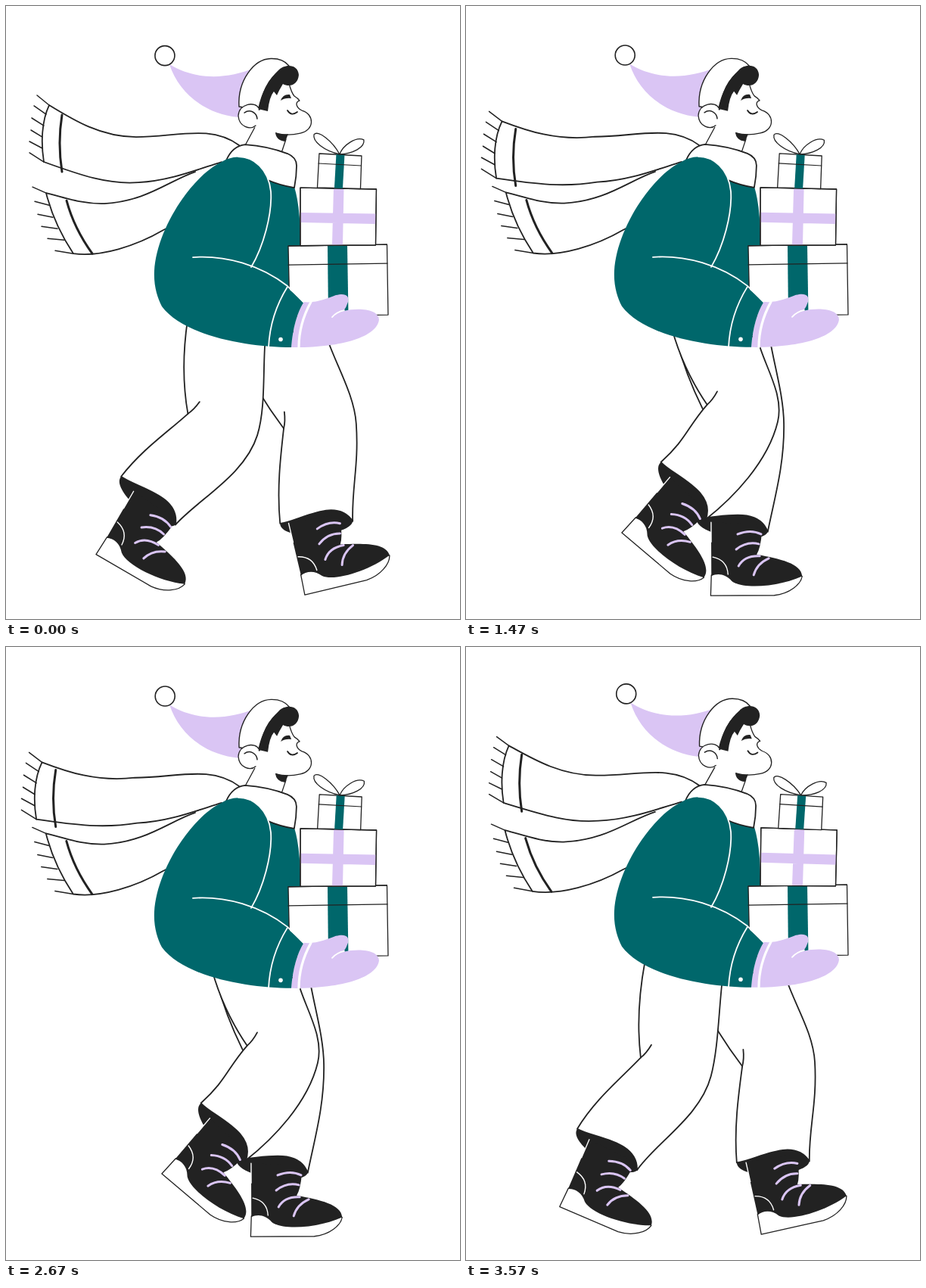
An HTML page that plays this animation: 600x810 px, repeating every 3.6 s.

```html
<!DOCTYPE html>
<html lang="en">
<head>
<meta charset="utf-8">
<title>Winter walk with presents</title>
<style>
html, body { margin: 0; width: 100%; height: 100%; overflow: hidden; background: #fff; }
svg { display: block; width: 600px; height: 810px; }
.ink { fill: none; stroke: #222; stroke-width: 1.8; }
.body { fill: #fff; stroke: #222; stroke-width: 1.8; }
.thin { fill: #fff; stroke: #222; stroke-width: 1.3; }
.dark { fill: #222; }
.teal { fill: #00676b; }
.lilac { fill: #dac5f4; }
.seam { fill: none; stroke: #fff; stroke-width: 1.8; }
.lace { fill: none; stroke: #dac5f4; stroke-width: 3; }
path { stroke-linecap: round; stroke-linejoin: round; }
</style>
</head>
<body>
<svg viewBox="0 0 600 810">
  <defs>
    <g id="boot">
      <path class="thin" d="M1,-27 L0,0 L84,0 C104,-2 119,-14 121,-25 C110,-30 20,-40 1,-27Z"/>
      <path class="dark" d="M1,-97 L1,-26 C9,-30 20,-29 28,-19 C42,-8 90,-11 121,-25 C120,-42 92,-48 61,-54 Q66,-62 68,-82 L60,-94Z"/>
      <path class="seam" style="stroke-width:1.4" d="M1,-97 V-71 M3,-51 Q22,-47 23,-28"/>
      <path class="lace" d="M36,-81 Q53,-88 67,-81 M34,-61 Q48,-72 64,-68 M37,-39 Q45,-53 65,-52 M57,-27 Q61,-42 77,-49"/>
    </g>
  </defs>
  <g id="scarf">
    <path class="body" id="lowTail"/>
    <path class="ink" id="lowFringe" style="stroke-width:1.5"/>
    <path class="ink" id="lowBand" style="stroke-width:3"/>
    <path class="body" id="topTail"/>
    <path class="ink" id="topFringe" style="stroke-width:1.5"/>
    <path class="ink" id="topBand" style="stroke-width:3"/>
  </g>
  <g id="legs"></g>
  <g id="head">
    <path fill="#fff" d="M329,158 L314,190 L362,198 L372,168 L345,150Z"/>
    <path class="ink" style="stroke-width:1.3" d="M329,160 L315,186 M370,176 L364,194"/>
    <path class="lilac" d="M328,82 C292,97 250,98 216,77 C228,114 262,143 308,147 L316,110Z"/>
    <circle class="thin" cx="210" cy="65.5" r="13" style="stroke-width:1.6"/>
    <path fill="#fff" d="M335,110 L374,96 L381,117 L388,124 L384,130 L392,138 C410,146 405,168 382,169 L357,168 L328,160Z"/>
    <path class="ink" style="stroke-width:1.3" d="M374,102 Q377,114 381,119 Q386,122 388,125 Q384,126 384,130 Q385,135 391,138 C408,143 408,164 389,168 Q372,172 357,168"/>
    <path class="dark" d="M356,167 Q364,171 373,169 L369,179 Q357,178 356,167Z"/>
    <path class="body" style="stroke-width:1.4" d="M308,133 C306,98 328,70 350,69.500 Q366,69 374,79 C352,88 339,108 335,137Z"/>
    <path class="dark" d="M333,136 C338,113 347,97 360,85 C368,76 386,76 387,91 C386,104 375,108 366,103 Q361,111 358,118 L354,113 Q348,120 346,139Z"/>
    <path class="dark" d="M363,125 Q366,116 375,117 L377,122 Q369,121 363,125Z"/>
    <path class="ink" d="M372,138 Q377,146 385,140"/>
    <path class="thin" d="M334,135 C330,126 308,128 307,145 C308,160 323,164 330,158"/>
    <path class="ink" style="stroke-width:1.5" d="M315,141 C322,136 331,140 332,149"/>
  </g>
  <g id="torso"><path class="teal" d="M300,210 L348,228 L381,239 Q389,265 389,310 L389,400 L300,400Z"/></g>
  <g id="collar"><path class="body" d="M291,204 Q299,185 316,183 Q346,185 372,195 Q384,200 384,211 Q384,225 381,240 Q362,237 346,230 L320,206Z"/></g>
  <g id="bigBox">
    <path class="thin" d="M373,317 L503.500,315 L505,408 L375,410Z"/>
    <path class="teal" d="M425,317 L451,316 L452.500,408 L426,409Z"/>
    <path class="ink" style="stroke-width:1.3" d="M373,342 L504,340 M373,317 L503.500,315"/>
  </g>
  <g id="midBox">
    <path class="thin" d="M389,240 L489.500,242 L488.500,316 L389,316.500Z"/>
    <path class="lilac" d="M433,241 L446.500,242 L445,315.500 L431,315.500Z M389.700,273 L489,274.500 L488.500,288 L389.700,286Z"/>
    <path class="ink" style="stroke-width:1.3" d="M389,240 L489.500,242 L488.500,316 L389,316.500Z"/>
    <g id="topBox">
      <path class="thin" d="M414,195 L470,198 L468.500,241.500 L411.500,240Z"/>
      <path class="teal" d="M436.500,196 L447.500,197 L445,241 L434,240.500Z"/>
      <path class="ink" style="stroke-width:1.2" d="M413,208 L469.500,211"/>
      <path id="loopL" class="thin" d="M441,196 C432,179 412,163 407,170 C405,179 420,191 441,196Z"/>
      <path id="loopR" class="thin" d="M441,196 C445,184 463,172 473,177 C475,187 458,195 441,196Z"/>
    </g>
  </g>
  <g id="arm">
    <path class="lilac" d="M377,451 C379,425 385,405 393,391 C410,393 425,386 436,382 C448,379 454,382 452,391 Q450,398 446,403 C468,398 492,401 493,414 C491,438 440,452 377,451Z"/>
    <path class="teal" d="M285,206 C245,225 199,295 196,350 C195,370 200,385 206,397 C235,436 320,451 377,451 C379,425 385,405 393,392 C375,372 352,357 324,345 C340,318 352,275 350,245 C347,215 327,199.500 307,199.500 Q294,200 285,206Z"/>
    <path class="seam" d="M247,332 C290,329 336,342 372,370 L393,391 M324,345 C340,318 352,275 350,245 C347,215 327,199 307,199 M372,371 Q349,408 347,451"/>
    <path class="seam" style="stroke-width:3.200" d="M403,391 Q387,420 387,451"/>
    <path class="seam" d="M431,411 Q437,404 447,402"/>
    <circle cx="363" cy="440.500" r="2.800" fill="#fff"/>
  </g>
</svg>
<script>
const $ = id => document.getElementById(id);
const STEP = 600, CYCLE = 1200, RAD = Math.PI / 180;

// time, knee x, knee y, heel x, heel y, boot angle, cuff shift
const nearKeys = [
  [0, 286, 553, 119, 725, 30, 24],
  [150, 330, 552, 128, 672, 52, 26],
  [300, 372, 536, 228, 705, 35, 26],
  [450, 392, 538, 350, 760, -5, 24],
  [570, 393, 545, 385, 776, -15.5, 21],
  [720, 380, 551, 368, 778, -1, 28],
  [870, 327, 552, 290, 779, 0, 30],
  [1020, 281, 556, 200, 778, 4, 32],
  [1140, 269, 554, 134, 752, 17, 31],
  [1170, 277, 555, 124, 740, 23, 28]
];
const farKeys = [
  [0, 415, 555, 395, 778, -13.4, 37],
  [150, 398, 555, 370, 779, -1, 32],
  [300, 365, 553, 310, 779, 0, 28],
  [450, 324, 556, 230, 777, 5, 24],
  [570, 318, 557, 175, 746, 20, 18],
  [720, 362, 550, 170, 672, 50, 24],
  [870, 402, 536, 262, 706, 35, 28],
  [1020, 411, 539, 350, 760, -2, 31],
  [1140, 411, 548, 382, 773, -8.5, 33],
  [1170, 413, 551, 390, 776, -12.5, 36]
];

// Smooth periodic interpolation through the keys
function pose(keys, t) {
  const n = keys.length;
  let i = n - 1;
  while (keys[i][0] > t) i--;
  const at = j => {
    const turn = Math.floor(j / n), row = keys[j - turn * n];
    return [row[0] + turn * CYCLE, ...row.slice(1)];
  };
  const [a, b, c, d] = [at(i - 1), at(i), at(i + 1), at(i + 2)];
  const h = c[0] - b[0], u = (t - b[0]) / h, v = 1 - u;
  return b.slice(1).map((p, k) => {
    k++;
    const m1 = (c[k] - a[k]) / (c[0] - a[0]) * h;
    const m2 = (d[k] - b[k]) / (d[0] - b[0]) * h;
    return p * (1 + 2 * u) * v * v + m1 * u * v * v + c[k] * u * u * (3 - 2 * u) - m2 * u * u * v;
  });
}

const add = (p, q, k = 1) => [p[0] + q[0] * k, p[1] + q[1] * k];
const axis = a => [Math.cos(a), Math.sin(a)];
const down = a => [-Math.sin(a), Math.cos(a)];
const pt = p => p[0].toFixed(2) + ',' + p[1].toFixed(2);
const curve = (...p) => 'C' + p.map(pt).join(' ');

function makeLeg(keys, frontX, minFront) {
  const g = document.createElementNS('http://www.w3.org/2000/svg', 'g');
  g.innerHTML = '<path class="dark" d="M0,0 C0,24 93,20 96,0 C75,-34 25,-4 0,0Z"/>' +
    '<use href="#boot"/><path class="body"/><path class="ink"/>';
  $('legs').append(g);
  const [hole, boot, cloth, crease] = g.children;
  return t => {
    const [kx, ky, hx, hy, phi, shift] = pose(keys, t);
    const knee = [kx, ky], f = phi * RAD, c = f + 11.5 * RAD;
    const cuff = add(add([hx, hy], axis(f), shift), down(f), shift / 2 - 108);
    const back = add(cuff, axis(c), -48), front = add(cuff, axis(c), 48);
    const shin = Math.atan2(kx - cuff[0], cuff[1] - ky);
    const m = shin / 2 - 5 * RAD;
    const kb = add(knee, axis(m), -48), kf = add(knee, axis(m), 48);
    const hipB = [kx * 0.37 + 134, 415];
    const hipF = [Math.max(kx * 0.53 + frontX, minFront), 438];
    const bend = [(hipB[0] + kb[0]) / 2 - 10, (hipB[1] + kb[1]) / 2 + 5];
    const lid = (x, y) => add(add(back, axis(c), x), down(c), y);
    boot.setAttribute('transform', `translate(${hx} ${hy}) rotate(${phi})`);
    hole.setAttribute('transform', `translate(${back}) rotate(${c / RAD})`);
    cloth.setAttribute('d', 'M' + pt(hipB) + 'Q' + pt(bend) + ' ' + pt(kb) +
      curve(add(add(kb, down(shin), 38), axis(m), -3), add(add(back, down(c), -45), axis(c), -3), back) +
      curve(lid(25, -2), lid(75, -34), front) +
      curve(add(front, down(c), -45), add(kf, down(m), 55), kf) +
      curve(add(kf, down(m), -38), add(hipF, [(kf[0] - hipF[0]) / 3, (kf[1] - hipF[1]) / 3]), hipF) + 'Z');
    const tip = add(kb, down(shin), -22), mid = add(add(kb, down(shin), -10), axis(shin), 2);
    crease.setAttribute('d', 'M' + pt(kb) + 'Q' + pt(mid) + ' ' + pt(tip));
  };
}
const legs = [makeLeg(farKeys, 204, 0), makeLeg(nearKeys, 191, 339)];

// Moves every coordinate pair of a path
const warp = (d, fn) => d.replace(/(-?[\d.]+),(-?[\d.]+)/g, (_, x, y) => pt(fn(+x, +y)));
const clamp = v => Math.max(0, Math.min(1, v));

const cloth = {
  low: {
    Tail: 'M250,219 C215,231 185,258 130,261 C100,262 75,252 53,247 C60,275 73,303 89,327 C125,332 172,317 208,296 L260,270',
    Band: 'M80,257 Q90,294 114,327',
    Fringe: 'M35,239 L53,247 M38,258 L57,263 M42,275 L62,279 M47,291 L68,294 M55,307 L77,309 M65,323 L89,327'
  },
  top: {
    Tail: 'M308,184 C270,156 225,173 172,173 C125,173 88,150 57,131 C47,152 46,181 50,206 C100,224 135,236 175,233 C215,231 250,217 285,206',
    Band: 'M74,144 Q68,181 74,219',
    Fringe: 'M41,118 L57,131 M37,132 L53,143 M34,148 L50,158 M33,164 L48,173 M31,179 L48,188 M31,194 L50,206'
  }
};

function drawScarf(w, s) {
  const move = {
    low: (x, y) => {
      const k = clamp((265 - x) / 210);
      return [x + 5 * k * s, y + (3 + 13 * k) * s];
    },
    top: (x, y) => {
      const far = clamp((180 - x) / 140), lag = 0.17 - 1.8 * far * far;
      const amp = 11 - 7 * clamp((x - 180) / 120);
      const pull = 5.5 * clamp((200 - x) / 160);
      return [x + pull * (Math.cos(w - 0.1) - Math.cos(0.1)),
        y + amp * (Math.sin(w + lag) - Math.sin(lag))];
    }
  };
  for (const tail in cloth)
    for (const part in cloth[tail])
      $(tail + part).setAttribute('d', warp(cloth[tail][part], move[tail]));
}

const place = (id, x, y, a = 0, cx = 0, cy = 0) =>
  $(id).setAttribute('transform', `translate(${x} ${y}) rotate(${a} ${cx} ${cy})`);

function draw(t) {
  const w = t / STEP * 2 * Math.PI;
  const s = Math.sin(w + 0.17) - Math.sin(0.17);
  drawScarf(w, s);
  legs.forEach(leg => leg(t % CYCLE));
  place('head', 0, 4 * s, -3.27 * s, 350, 165);
  place('torso', 0, 4 * s);
  place('arm', 0, 4 * s);
  place('collar', 3 * s, 4 * s);
  place('bigBox', 0, 3 * s);
  place('midBox', 0, 2.2 * s, -2 * s, 438, 316);
  place('topBox', -1.5 * s, -1.5 * s);
  place('loopL', 0, 0, 17 * s, 441, 196);
  place('loopR', 0, 0, -13 * s, 441, 196);
}

const start = performance.now();
function tick() {
  draw((performance.now() - start) % 3600);
  requestAnimationFrame(tick);
}
draw(0);
requestAnimationFrame(tick);
</script>
</body>
</html>
```
